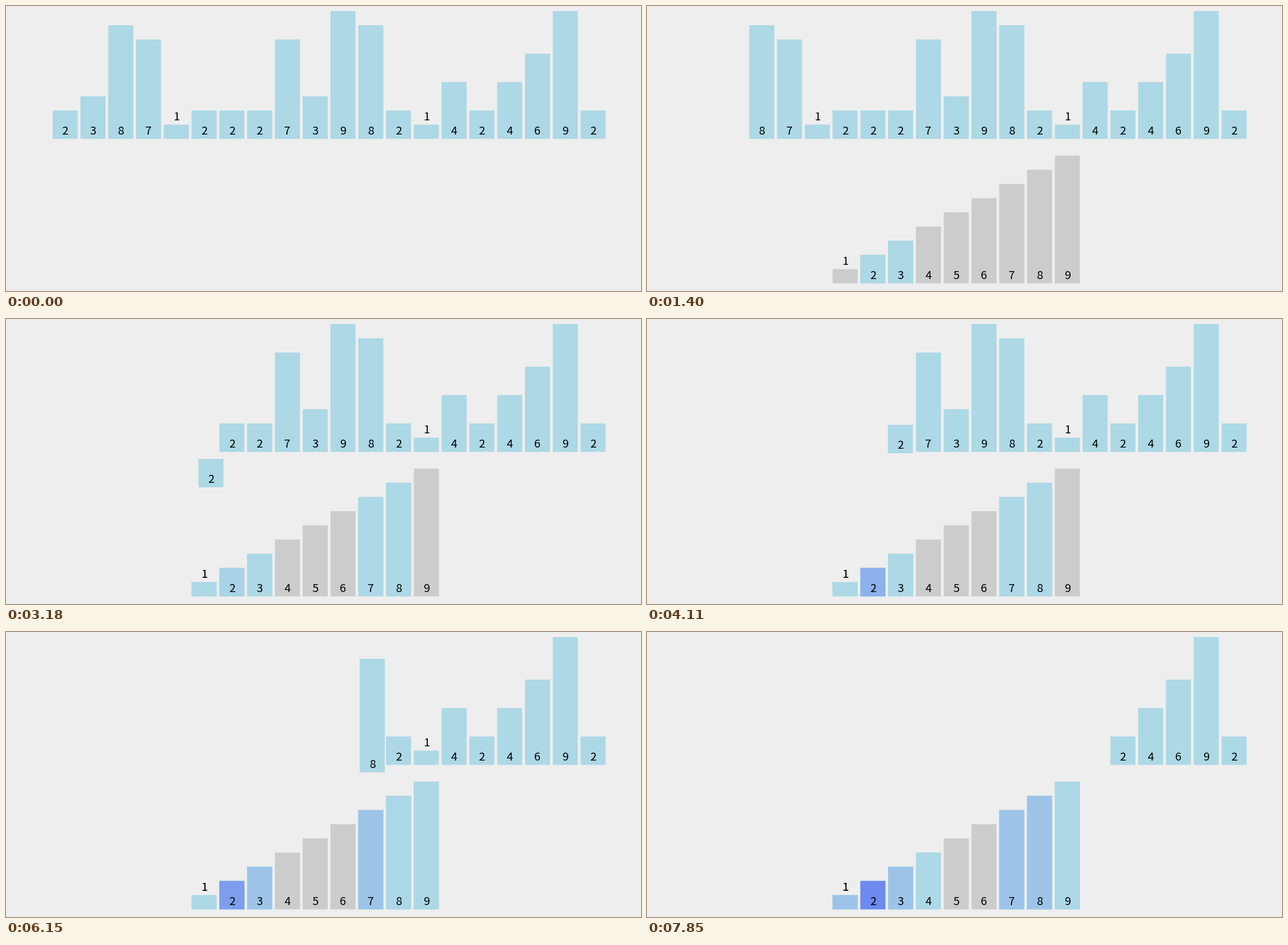
Recreate the animation shown at these times as a matplotlib script. Size 1117x501 px, loop 8000 ms.

```python
import matplotlib.pyplot as plt
import numpy as np
from matplotlib.animation import FuncAnimation
from matplotlib.patches import Rectangle

W, H, DPI = 1117, 501, 64
LOOP, TICK = 8000, 20
VALUES = [int(c) for c in "23871222739821424692"]

X0, PITCH, BAR_W = 82.1, 48.87, 44
UNIT = 24.95
TOP_BASE, DROP = 233.5, 254
FIRST_BUCKET = 5

# A transition of LENGTH ms starts every PERIOD ms.
START, PERIOD, LENGTH = 85, 500, 250
# The picture is refreshed only at PHASE + k * REFRESH ms.
PHASE, REFRESH = 145.5, 77.9

BLACK = np.zeros(3)
GREY = np.array([204, 204, 204]) / 255
LIGHT = np.array([173, 216, 230]) / 255
BLUE = np.array([0, 0, 255]) / 255


def mix(a, b, k):
    return a + (b - a) * k


def ease(t, event):
    """Cubic in-out progress of a numbered transition at time t."""
    u = min(max((t - START - PERIOD * event) / LENGTH, 0), 1)
    return 4 * u ** 3 if u < 0.5 else 1 - 4 * (1 - u) ** 3


def slot_x(i):
    return X0 + PITCH * i


def count_color(count):
    if count < 1:
        return mix(GREY, LIGHT, count)
    return mix(LIGHT, BLUE, (count - 1) / 11)


fig = plt.figure(figsize=(W / DPI, H / DPI), dpi=DPI, facecolor="#eeeeee")
ax = fig.add_axes([0, 0, 1, 1])
ax.set_xlim(0, W)
ax.set_ylim(H, 0)
ax.axis("off")


class Bar:
    def __init__(self, value, z):
        self.value = value
        self.height = value * UNIT
        # The shortest bar carries its label above itself.
        self.label_y = self.height - 15 if value > 1 else -15
        self.rect = ax.add_patch(Rectangle((0, 0), BAR_W, self.height, lw=0,
                                           fc=LIGHT, snap=False, zorder=z))
        self.text = ax.text(0, 0, str(value), ha="center", va="baseline",
                            family="Noto Sans CJK JP", color="black",
                            fontsize=20 * 72 / DPI, zorder=z + 0.5)

    def place(self, x, base, grow=1):
        top = base - self.height
        self.rect.set_bounds(x, top, BAR_W * grow, self.height * grow)
        self.text.set_position((x + BAR_W / 2,
                                top + self.label_y * grow + 7.3))

    def show(self, on):
        self.rect.set_visible(on)
        self.text.set_visible(on)


bars = [Bar(v, 1 + i) for i, v in enumerate(VALUES)]
buckets = [Bar(v, 30 + v) for v in range(1, 10)]


def update(n):
    now = (n + 1) * TICK
    t = PHASE + REFRESH * ((now - PHASE) // REFRESH)
    counts = np.zeros(10)

    for i, bar in enumerate(bars):
        k = ease(t, i + 1)
        goal = slot_x(FIRST_BUCKET + bar.value - 1)
        bar.place(mix(slot_x(i), goal, k), TOP_BASE + DROP * k)
        counts[bar.value] += k

    grow = ease(t, 0)
    for i, bucket in enumerate(buckets):
        bucket.show(grow > 0)
        bucket.place(slot_x(FIRST_BUCKET + i), TOP_BASE + DROP, grow)
        color = count_color(counts[bucket.value])
        bucket.rect.set_facecolor(mix(BLACK, color, grow))
    return []


anim = FuncAnimation(fig, update, frames=LOOP // TICK, interval=TICK,
                     repeat=True, repeat_delay=0, blit=False)
plt.show()
```
